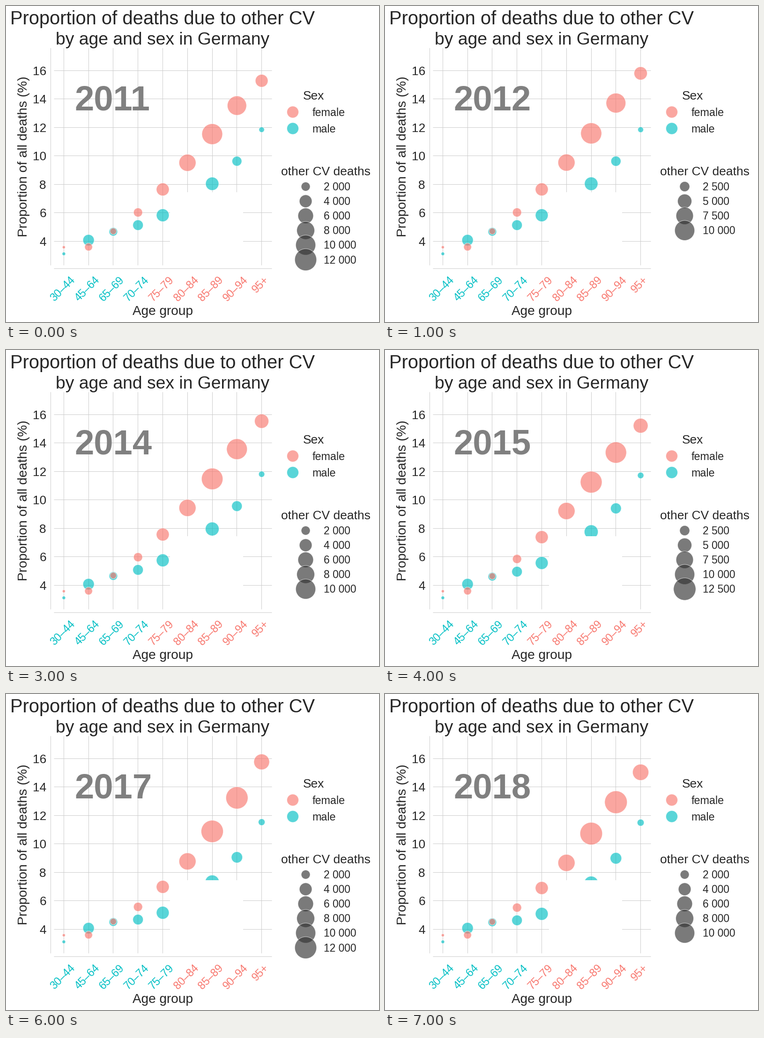
Recreate the animation shown at these times as a matplotlib script. Size 796 px wide and 672 px high, loop 8 s.

```python
import math

import matplotlib.pyplot as plt
import numpy as np
from matplotlib.animation import FuncAnimation
from matplotlib.patches import Circle, Rectangle

W, H, DPI = 796, 672, 100
PT = 72 / DPI
INK, GRID, GREY = "#262626", "#cccccc", "#808080"
FEMALE, MALE = "#F8766D", "#00BFC4"
plt.rcParams["font.family"] = "Liberation Sans"

FIRST_YEAR, YEARS = 2011, 8
AGES = ["30–44", "45–64", "65–69", "70–74", "75–79",
        "80–84", "85–89", "90–94", "95+"]
K = np.arange(len(AGES))
X = 123.4 + 52.77 * K

# Per sex: colour, early heights and mean radii by age group, sway of the oldest
GROUPS = [
    (MALE, [527, 498, 480, 466, 445, 417, 378, 330, 263],
     [3.6, 12, 9, 11, 13.5, 14.5, 14.6, 11.2, 6.5], 0),
    (FEMALE, [513, 512.5, 479, 439, 390, 333, 271, 207, 145],
     [3.1, 8.2, 6.8, 9.5, 13.6, 18, 22.9, 22.2, 15.3], 14),
]

# Step and number of entries in the size legend, year by year
SIZES = [(2000, 6), (2500, 4), (2500, 4), (2000, 5),
         (2500, 5), (2000, 5), (2000, 6), (2000, 5)]


def heights(early, sway, i):
    """Shares hold until 2013, then ease down, most of all around 80–84."""
    s = min(max((i - 2) / 5, 0), 1)
    ease = s * s * (3 - 2 * s)
    drop = 26 * np.maximum(np.sin(np.pi * (K - 1.5) / 7.5), 0)
    wave = sway * (K / 8) ** 8 * math.cos(2 * math.pi * i / 3.7)
    return early + drop * ease + wave


def radii(mean, i):
    """Only the oldest groups grow over the years."""
    return mean * (1 + 0.08 * np.maximum(K - 5, 0) * (i / 7 - 0.5))


fig = plt.figure(figsize=(W / DPI, H / DPI), dpi=DPI, facecolor="white")
ax = fig.add_axes([0, 0, 1, 1])
ax.set_xlim(0, W)
ax.set_ylim(H, 0)
ax.axis("off")


def text(x, y, s, px, color=INK, ha="center", **kw):
    return ax.text(x, y, s, fontsize=px * PT, color=color, ha=ha,
                   va="baseline", rotation_mode="anchor", zorder=5, **kw)


def line(x0, y0, x1, y1):
    """One-pixel line through pixel centres."""
    ax.plot(np.floor([x0, x1]) + 0.5, np.floor([y0, y1]) + 0.5, color=GRID,
            lw=PT, zorder=1, solid_capstyle="butt", snap=False)


def bubble(x, y, r, color):
    return ax.add_patch(Circle((x, y), r, facecolor=color, edgecolor="white",
                               lw=PT, alpha=0.65, zorder=2))


# Title, axes and grid
text(334.5, 39, "Proportion of deaths due to other CV", 39.9)
text(334, 82, "by age and sex in Germany", 37.3)
for k in range(7):
    y = 500.2 - 60.45 * k
    line(102, y, 567, y)
    text(86, y + 9.3, str(4 + 2 * k), 26.2, ha="right")
for x in X:
    line(x, 89, x, 551)
line(95, 89, 95, 551)
line(102, 558, 567, 558)
ax.add_patch(Rectangle((350, 396), 156, 156, color="white", lw=0, zorder=3))
text(334.5, 657, "Age group", 28)
text(45.5, 320.5, "Proportion of all deaths (%)", 28.2, rotation=90)

# Fixed legend
text(656.5, 199, "Sex", 26.4)
for y, label, color in [(225.5, "female", FEMALE), (260.5, "male", MALE)]:
    bubble(612, y, 12.5, color)
    text(653.5, y + 8.5, label, 23.2, ha="left")
text(682.5, 360, "other CV deaths", 26.4)

year_text = text(146.5, 222, "", 74.2, GREY, ha="left", weight="bold")
age_texts = [text(x + 2, 606.5 - 3.2 * (5 - len(age)) * 1.4, age, 23,
                  rotation=45) for x, age in zip(X, AGES)]
moving = []


def draw(i):
    while moving:
        moving.pop().remove()
    year = FIRST_YEAR + i
    year_text.set_text(str(year))

    for color, early, mean, sway in GROUPS:
        spots = zip(X, heights(early, sway, i), radii(mean, i))
        moving.extend(bubble(x, y, r, color) for x, y, r in spots)

    # Age labels take the colour of the sex with more deaths
    male_groups = 5 if year == 2017 else 4
    for k, label in enumerate(age_texts):
        label.set_color(MALE if k < male_groups else FEMALE)

    step, count = SIZES[i]
    for k in range(count):
        n, y = step * (k + 1), 384 + 31.1 * k
        moving.append(bubble(639.5, y, 0.2125 * math.sqrt(n), "#333333"))
        label = f"{n:,}".replace(",", " ")
        moving.append(text(678, y + 8, label, 22.8, ha="left"))


anim = FuncAnimation(fig, draw, frames=YEARS, init_func=lambda: None,
                     interval=1000, repeat=True, repeat_delay=0)
plt.show()
```
